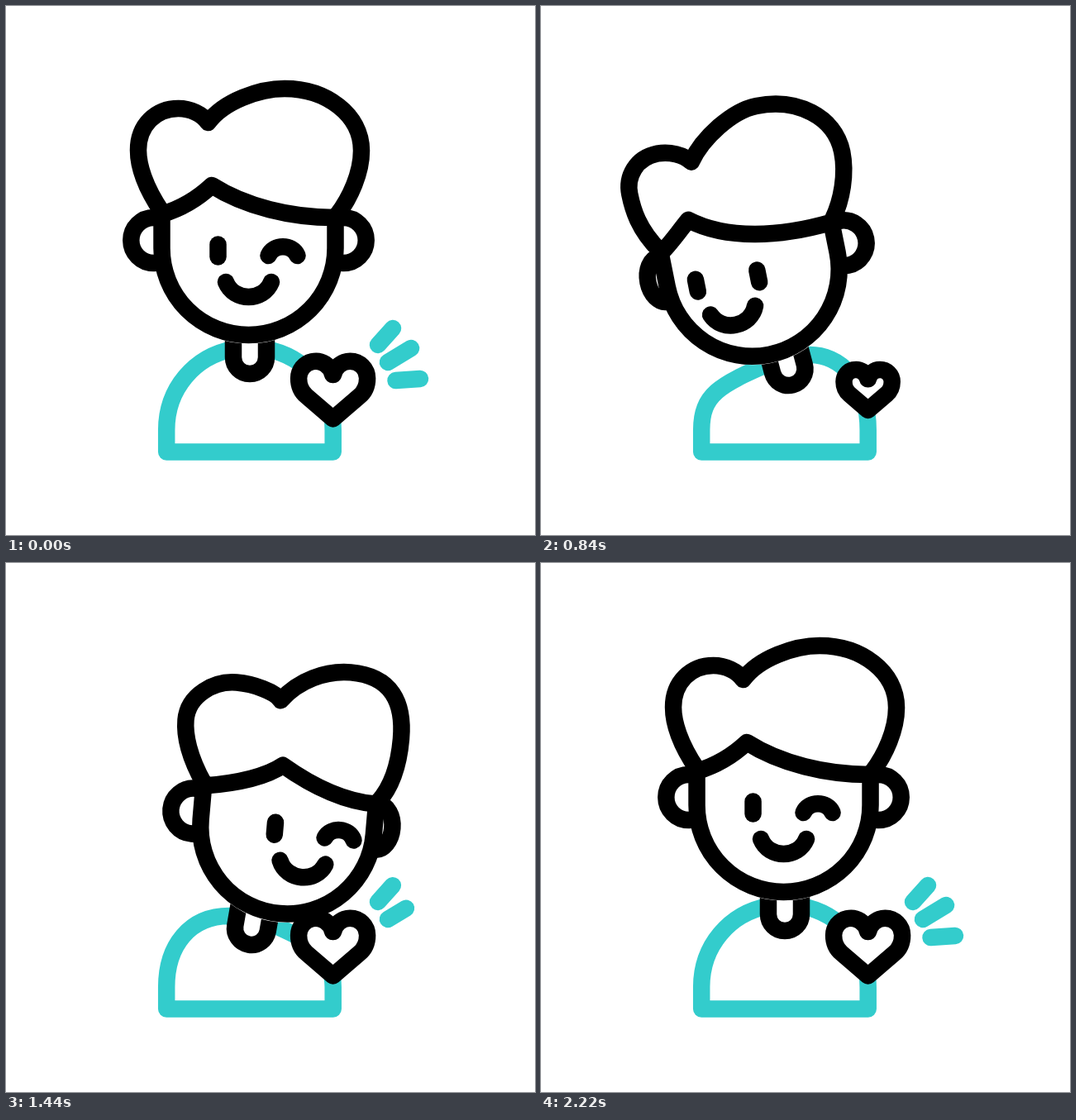
Write an HTML page with a canvas that moves like this. It is 640 px wide and 640 px high and loops after 2.4 s.

```html
<!DOCTYPE html>
<html lang="en">
<head>
<meta charset="utf-8">
<title>Winking boy with heart</title>
<style>
  html, body { margin: 0; width: 100%; height: 100%; overflow: hidden; background: #fff; }
  canvas { display: block; width: 100vmin; height: 100vmin; }
</style>
</head>
<body>
<canvas id="stage" width="640" height="640"></canvas>
<script>
const ctx = document.getElementById('stage').getContext('2d');
const LOOP = 2400, TEAL = '#33cccc', FACE = 105;

const clamp = (v, lo = 0, hi = 1) => Math.min(hi, Math.max(lo, v));
const mix = (a, b, k) => a + (b - a) * k;
const span = (t, from, to) => clamp((t - from) / (to - from));
const easeOut = v => 1 - (1 - v) ** 3;

// cubic-bezier(.8, 0, .1, 1)
function ease(x) {
  let lo = 0, hi = 1;
  for (let i = 0; i < 24; i++) {
    const s = (lo + hi) / 2, r = 1 - s;
    if (2.4 * s * r * r + 0.3 * s * s * r + s * s * s < x) lo = s; else hi = s;
  }
  return lo * lo * (3 - 2 * lo);
}

// How far the boy leans to either side; every part is driven by these two weights.
function leanAt(t) {
  const swing = ease(span(t, 755, 1500));
  return { l: ease(span(t, 0, 680)) * (1 - swing), r: swing * (1 - ease(span(t, 1500, 2250))) };
}

function stroke(color = '#000') {
  ctx.strokeStyle = color;
  ctx.stroke();
}

function fillStroke() {
  ctx.fillStyle = '#fff';
  ctx.fill();
  stroke();
}

function line(x1, y1, x2, y2, color) {
  ctx.beginPath();
  ctx.moveTo(x1, y1);
  ctx.lineTo(x2, y2);
  stroke(color);
}

function arch(x, y, half, bend) {
  ctx.beginPath();
  ctx.moveTo(x - half, y);
  ctx.bezierCurveTo(x - half * 0.65, y + bend, x + half * 0.65, y + bend, x + half, y);
  stroke();
}

function place(x, y, degrees, draw) {
  ctx.save();
  ctx.translate(x, y);
  ctx.rotate(degrees * Math.PI / 180);
  draw();
  ctx.restore();
}

// Open U shape: a half circle with two straight sides.
function cup(radius, side) {
  ctx.beginPath();
  ctx.moveTo(-radius, -side);
  ctx.arc(0, 0, radius, Math.PI, 0, true);
  ctx.lineTo(radius, -side);
  fillStroke();
}

function drawBody({ l, r }) {
  const x1 = 194.2, x2 = 395.7;
  ctx.beginPath();
  ctx.moveTo(x1, 539.5);
  ctx.lineTo(x1, 513);
  ctx.bezierCurveTo(x1, 463 + 7 * l, 228 - 12 * l - 6 * r, 424 + 35 * l + 3 * r,
    275 - 5 * r, 415 + 18 * l + 12 * r);
  ctx.lineTo(315 + 7 * (l + r), 415 + 7 * l + 22 * r);
  ctx.bezierCurveTo(362, 424 - 4 * l + 31 * r, x2, 463 - 8 * l + 7 * r, x2, 513);
  ctx.lineTo(x2, 539.5);
  ctx.closePath();
  stroke(TEAL);
}

// The ear on the far side narrows behind the face.
function drawEar(side, hidden) {
  ctx.beginPath();
  ctx.ellipse(side * (114.7 - 6.5 * hidden), -9.5, 27.5 - 9 * hidden, 27.5, 0, 0, 7);
  fillStroke();
}

function drawFeatures(winking) {
  line(-37, -4.5, -37, 10.5);
  if (winking) arch(41.5, 9, 17.5, -14.5);
  else line(38.2, -1, 38.2, 14);
  arch(0, 41, 27.5, 24);
}

function drawHair({ l, r }) {
  const lobeX = -133.5 + 6 * l, lobeTop = -169 + 9 * l;
  const notchX = -49 + 2 * l + 28 * r, notchY = -152 + 10 * l;
  const topX = 43.5 + 17 * r, sideX = 136.5 - 2 * l - 8.5 * r;
  const part = 33 * r - 20 * l;
  ctx.beginPath();
  ctx.moveTo(-105, -44);
  ctx.bezierCurveTo(-126, -75, lobeX, -101, lobeX, -118.5);
  ctx.bezierCurveTo(lobeX, lobeTop + 20, -112 + 9 * r, lobeTop, -85 + 9 * r, lobeTop);
  ctx.bezierCurveTo(-70 + 14 * r, lobeTop, notchX - 7, notchY - 10, notchX, notchY);
  ctx.bezierCurveTo(notchX + 19, notchY - 26, topX - 30, -193, topX, -193);
  ctx.bezierCurveTo(topX + 50, -193, sideX, -162, sideX, -118);
  ctx.bezierCurveTo(sideX, -91, 123, -61, 107, -40);
  ctx.lineTo(103.5, -37);
  ctx.bezierCurveTo(51.5 + part * 0.5, -37 + 5 * l, -3.5 + part, -50 + 9 * l,
    -44.5 + part, -76 + 2 * (l + r));
  ctx.bezierCurveTo(-61.5 + part, -60, -81.5 + part * 0.6, -48, -105, -41);
  ctx.closePath();
  fillStroke();
}

function drawHead(lean, winking) {
  const { l, r } = lean;
  // thin gap between chin and neck
  ctx.beginPath();
  ctx.arc(0, 0, FACE + 10.6, 0.8, 2.34);
  ctx.fillStyle = '#fff';
  ctx.fill();

  drawEar(-1, l);
  drawEar(1, r);
  cup(FACE, 43);
  place(22.5 * r - 33.3 * l, 2.8 * l, 0, () => drawFeatures(winking));
  drawHair(lean);
}

// Two beats: the scale eases from one level to the next at an even pace.
function heartScale(t) {
  const levels = [1, 0.7, 1.25, 0.7, 1.25, 1];
  const beat = clamp(t / 245 - 0.5, 0, 4.999), i = Math.floor(beat);
  return mix(levels[i], levels[i + 1], ease(beat - i));
}

function drawHeart(scale) {
  const lobe = 20.75, y = -13.5, notch = 0.22;
  ctx.save();
  ctx.translate(395.6, 464);
  ctx.scale(scale, scale);
  ctx.beginPath();
  ctx.arc(-lobe, y, lobe, -notch, Math.PI, true);
  ctx.bezierCurveTo(-2 * lobe, -5, -38, 3, -32, 8);
  ctx.lineTo(0, 35.5);
  ctx.lineTo(32, 8);
  ctx.bezierCurveTo(38, 3, 2 * lobe, -5, 2 * lobe, y);
  ctx.arc(lobe, y, lobe, 0, Math.PI + notch, true);
  ctx.closePath();
  ctx.restore();
  fillStroke();
}

const rays = [[450, 410, 468, 390], [462, 431, 490, 414], [471.5, 453, 501, 451]];

// Rays leave outwards one after another, then shoot out again.
function drawRays(t) {
  rays.forEach(([x1, y1, x2, y2], i) => {
    const grow = from => easeOut(span(t - 80 * i, from, from + 200));
    const returning = t >= 1280;
    const start = returning ? 0 : grow(0), end = returning ? grow(1280) : 1;
    if (end - start < 0.01) return;
    line(mix(x1, x2, start), mix(y1, y2, start), mix(x1, x2, end), mix(y1, y2, end), TEAL);
  });
}

function render(t) {
  const lean = leanAt(t), { l, r } = lean;
  const bob = 2.5 * Math.sin(Math.PI * span(t, 520, 1500));
  const winking = t < 300 || t >= 960;
  ctx.fillStyle = '#fff';
  ctx.fillRect(0, 0, 640, 640);
  ctx.lineWidth = 20.5;
  ctx.lineCap = ctx.lineJoin = 'round';
  drawBody(lean);
  place(295 + 4.5 * l + 2 * r, 425 + 14 * l + 17 * r, 10 * r - 15 * l, () => cup(20, 38));
  place(293.5 - 38.5 * l + 47 * r, 293 + 23.6 * l + 26 * r + bob, 5 * r - 11.5 * l,
    () => drawHead(lean, winking));
  drawHeart(heartScale(t));
  drawRays(t);
}

let begin;
function tick(now) {
  begin ??= now;
  render(Math.max(0, now - begin) % LOOP);
  requestAnimationFrame(tick);
}
render(0);
requestAnimationFrame(tick);
</script>
</body>
</html>
```
